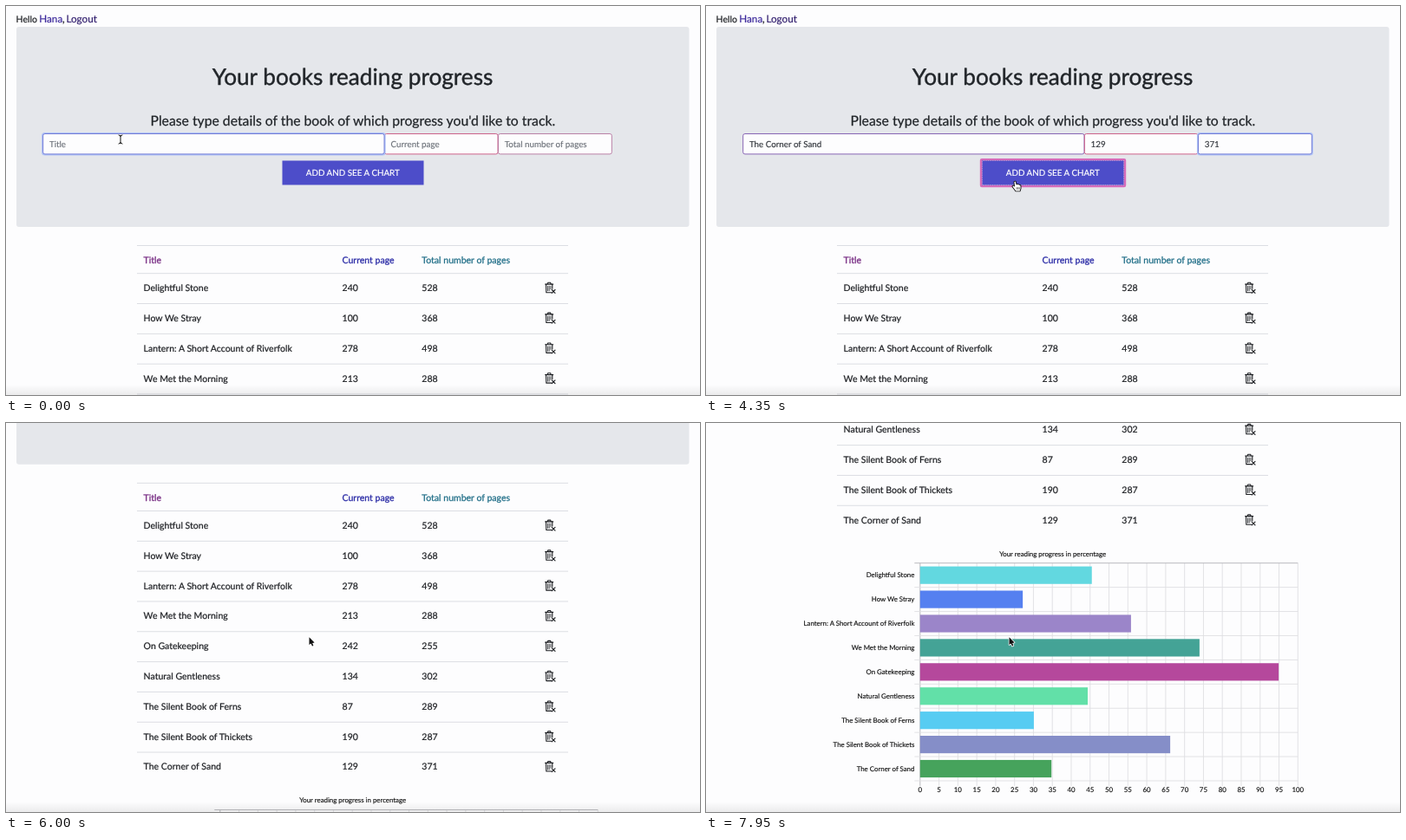
Write an HTML page with a canvas that moves like this. It is 800 px wide and 449 px high and loops after 8 s.

```html
<!DOCTYPE html>
<html lang="en">
<head>
<meta charset="utf-8">
<title>Reading progress</title>
<style>
html, body { margin: 0; width: 100%; height: 100%; overflow: hidden; background: #fdfdfe; }
canvas { display: block; width: 800px; height: 449px; }
</style>
</head>
<body>
<canvas id="stage"></canvas>
<script>
const W = 800, H = 449, LOOP = 8000;
const canvas = document.getElementById('stage');
const ctx = canvas.getContext('2d');
const dpr = window.devicePixelRatio || 1;
canvas.width = Math.round(W * dpr);
canvas.height = Math.round(H * dpr);
// Unhinted advances keep the letter spacing even while scrolling
ctx.textRendering = 'geometricPrecision';

const INK = '#1b1d21', RULE = '#dcdee3', MUTED = '#6b7078';
const ROW = 34.82, FIRST_ROW = 325.3;
const NEW_TITLE = 'The Corner of Sand';

// title, current page, total pages, bar colour
const books = [
  ['Delightful Stone', 240, 528, '#62d8e0'],
  ['How We Stray', 100, 368, '#5580f0'],
  ['Lantern: A Short Account of Riverfolk', 278, 498, '#9b85c9'],
  ['We Met the Morning', 213, 288, '#44a396'],
  ['On Gatekeeping', 242, 255, '#b5489c'],
  ['Natural Gentleness', 134, 302, '#62e0a8'],
  ['The Silent Book of Ferns', 87, 289, '#57ccf2'],
  ['The Silent Book of Thickets', 190, 287, '#858ec8'],
  [NEW_TITLE, 129, 371, '#46a35c']
];

const fields = [
  { x: 42.7, w: 393.3, hint: 'Title', text: NEW_TITLE, border: '#7c55ad', start: 650, step: 88, focus: [0, 2400] },
  { x: 436.4, w: 130.6, hint: 'Current page', text: '129', border: '#c9527f', start: 2600, step: 170, focus: [2400, 3150] },
  { x: 567.5, w: 130.8, hint: 'Total number of pages', text: '371', border: '#b4739d', start: 3350, step: 150, focus: [3150, 4600] }
];
const CLEARED = 4750;

const scrollKeys = [[5230, 0], [5600, 106.3], [6000, 206.9], [6700, 468.4], [7150, 492]];

const clamp = (v, a, b) => Math.min(b, Math.max(a, v));
const ease = p => p * p * (3 - 2 * p);
const progress = (t, a, b) => ease(clamp((t - a) / (b - a), 0, 1));

// Monotone cubic through [time, value] pairs
function curve(keys, t) {
  const n = keys.length - 1;
  if (t <= keys[0][0]) return keys[0][1];
  if (t >= keys[n][0]) return keys[n][1];
  const slope = i => (keys[i + 1][1] - keys[i][1]) / (keys[i + 1][0] - keys[i][0]);
  const tangent = i => {
    if (i === 0 || i === n) return 0;
    const a = slope(i - 1), b = slope(i);
    return a * b > 0 ? 2 * a * b / (a + b) : 0;
  };
  let i = 0;
  while (t > keys[i + 1][0]) i++;
  const [t0, v0] = keys[i], [t1, v1] = keys[i + 1];
  const d = t1 - t0, u = (t - t0) / d, u2 = u * u, u3 = u2 * u;
  return v0 * (2 * u3 - 3 * u2 + 1) + v1 * (3 * u2 - 2 * u3)
    + d * (tangent(i) * (u3 - 2 * u2 + u) + tangent(i + 1) * (u3 - u2));
}

function text(str, x, y, size, color = INK, align = 'left', weight = 0.2) {
  ctx.font = `${size}px Lato, sans-serif`;
  ctx.textAlign = align;
  ctx.fillStyle = ctx.strokeStyle = color;
  ctx.lineWidth = weight;
  ctx.lineJoin = 'round';
  ctx.fillText(str, x, y);
  if (weight) ctx.strokeText(str, x, y);
}

function line(x1, y1, x2, y2, color, width = 1) {
  ctx.strokeStyle = color;
  ctx.lineWidth = width;
  ctx.beginPath();
  ctx.moveTo(x1, y1);
  ctx.lineTo(x2, y2);
  ctx.stroke();
}

function box(x, y, w, h, r, fill, stroke, width = 1) {
  ctx.beginPath();
  ctx.roundRect(x, y, w, h, r);
  if (fill) { ctx.fillStyle = fill; ctx.fill(); }
  if (stroke) { ctx.strokeStyle = stroke; ctx.lineWidth = width; ctx.stroke(); }
}

function shape(points, fill, stroke, width = 1) {
  ctx.beginPath();
  points.forEach(([x, y]) => ctx.lineTo(x, y));
  ctx.closePath();
  ctx.lineJoin = 'round';
  ctx.strokeStyle = stroke;
  ctx.lineWidth = width;
  ctx.stroke();
  ctx.fillStyle = fill;
  ctx.fill();
}

function drawField(f, t) {
  const y = 147.5, h = 23.4;
  const focused = t >= f.focus[0] && t < f.focus[1];
  if (focused) box(f.x - 1.6, y - 1.6, f.w + 3.2, h + 3.2, 3.5, '#aec2f6');
  box(f.x, y, f.w, h, 2.2, '#fdfdfe', focused ? '#6a72d2' : f.border, 0.9);
  const count = t < CLEARED ? clamp(Math.floor((t - f.start) / f.step) + 1, 0, f.text.length) : 0;
  const typed = f.text.slice(0, count);
  const x = f.x + 7.2;
  if (count) text(typed, x, 162.6, 9.82, '#30343a', 'left', 0.15);
  else text(f.hint, x, 162.6, 9.82, MUTED, 'left', 0.15);
  const typing = t >= f.start && t < f.start + f.step * f.text.length + 150;
  if (focused && typing) {
    const cx = x + ctx.measureText(typed).width + 0.3;
    line(cx, 153.5, cx, 165, '#222', 0.8);
  }
}

function drawForm(t) {
  text('Hello', 11.6, 18.8, 10.52);
  text('Hana', 38.3, 18.8, 11.7, '#3d2a9c');
  text(',', 65.1, 18.8, 11.7);
  text('Logout', 69.4, 18.8, 11.7, '#33206f');
  box(12, 24, 775.5, 231, 3, '#e5e7eb');
  text('Your books reading progress', 399.5, 91, 26.2, '#212529', 'center', 0.4);
  text("Please type details of the book of which progress you'd like to track.", 399.8, 138.4, 15.76, '#212529', 'center', 0.25);
  const isFocused = f => t >= f.focus[0] && t < f.focus[1];
  fields.filter(f => !isFocused(f)).forEach(f => drawField(f, t));
  fields.filter(isFocused).forEach(f => drawField(f, t));

  box(318.5, 178.6, 163, 28, 0, '#4d4dc9');
  if (t >= 4150 && t < CLEARED) {
    box(317, 177.1, 166, 31, 1, null, '#d66cba', 2.4);
    ctx.setLineDash([1.3, 1.3]);
    box(318.4, 178.5, 163.2, 28.2, 0, null, '#7a4cc0', 0.8);
    ctx.setLineDash([]);
  }
  text('ADD AND SEE A CHART', 399.8, 196.1, 9.84, '#fff', 'center', 0.2);
}

function drawBin(y) {
  ctx.save();
  ctx.translate(627, y);
  ctx.lineCap = 'round';
  line(-5.3, -4.2, 3.6, -4.2, INK, 1.2);
  ctx.lineWidth = 1.1;
  ctx.beginPath();
  ctx.moveTo(-2.8, -4.4);
  ctx.lineTo(-2.3, -6);
  ctx.lineTo(0.7, -6);
  ctx.lineTo(1.2, -4.4);
  ctx.moveTo(2.8, -4);
  ctx.lineTo(2.8, 1);
  ctx.moveTo(-4.5, -4);
  ctx.lineTo(-4.2, 5.4);
  ctx.lineTo(1.8, 5.4);
  ctx.stroke();
  [-2.5, -0.8, 0.9].forEach(x => line(x, -2, x, x > 0 ? 1.4 : 3.4, INK, 0.8));
  line(2.2, 2.2, 6, 6, INK, 1.1);
  line(6, 2.2, 2.2, 6, INK, 1.1);
  ctx.restore();
}

function drawTable() {
  const rule = y => line(151, y, 648, y, RULE);
  rule(276.5);
  text('Title', 158.6, 296.8, 10.52, '#762a82', 'left', 0.3);
  text('Current page', 387.5, 296.8, 10.52, '#2a2ba6', 'left', 0.3);
  text('Total number of pages', 479.3, 296.8, 10.52, '#237089', 'left', 0.3);
  rule(308.7);
  books.forEach(([title, page, total], i) => {
    const y = FIRST_ROW + i * ROW;
    text(title, 158.6, y + 3.8, 10.52);
    text(page, 387.6, y + 3.8, 10.52);
    text(total, 479.3, y + 3.8, 10.52);
    drawBin(y);
    if (i < books.length - 1) rule(308.7 + (i + 1) * ROW);
  });
}

function drawChart() {
  const left = 246.8, right = 682.3, top = 653.7, pitch = 27.92;
  const bottom = top + pitch * books.length;
  const unit = (right - left) / 100;
  text('Your reading progress in percentage', 399.7, 645.6, 7.87, '#111', 'center', 0.15);
  for (let v = 0; v <= 100; v += 5) {
    const x = left + v * unit;
    line(x, top, x, bottom + 6, v ? '#dfdfe2' : '#b4b4b8', 0.9);
    text(v, x, bottom + 13, 7.87, '#111', 'center', 0.15);
  }
  for (let i = 0; i <= books.length; i++) {
    const y = top + i * pitch;
    line(240.3, y, right, y, i ? '#dfdfe2' : '#b4b4b8', 0.9);
  }
  books.forEach(([title, page, total, color], i) => {
    const y = top + (i + 0.5) * pitch;
    ctx.fillStyle = color;
    ctx.fillRect(left, y - 10.1, page / total * 100 * unit, 20.2);
    text(title, 240.4, y + 2.7, 7.87, '#111', 'right', 0.15);
  });
}

function drawBeam(x, y) {
  ctx.lineCap = 'round';
  [['#fff', 2.2], ['#111', 1]].forEach(([color, width]) => {
    line(x, y - 4.5, x, y + 4.5, color, width);
    [-1, 1].forEach(s => {
      line(x, y + s * 4, x - 2, y + s * 5, color, width);
      line(x, y + s * 4, x + 2, y + s * 5, color, width);
    });
  });
  ctx.lineCap = 'butt';
}

function drawArrow(x, y) {
  ctx.save();
  ctx.translate(x, y);
  shape([[0, 0], [0, 8.8], [2, 7.1], [3.5, 10.3], [4.9, 9.7], [3.6, 6.6], [6.1, 6.3]], '#111', '#fff', 1.5);
  ctx.restore();
}

function drawHand(x, y) {
  ctx.save();
  ctx.translate(x, y);
  shape([[-2.6, -5], [-1.3, -5.4], [-0.4, -1.8], [1.3, -2], [3, -1.4], [4.5, -0.6], [4.6, 2.4],
    [3.7, 5.4], [-0.8, 5.4], [-2.8, 2.8], [-4.6, 0.4], [-3.6, -0.5], [-1.9, 0.8]], '#fff', '#111', 1.8);
  [0.1, 1.7, 3.2].forEach(dx => line(dx, 1.2, dx, 3.7, '#111', 0.6));
  ctx.restore();
}

function drawPointer(t) {
  if (t < 600) return drawBeam(132, 154);
  if (t < 3850) return;
  if (t < 4750) {
    const p = progress(t, 3850, 4270);
    const x = 132 + 226 * p, y = 154 + 54 * p;
    const overButton = x > 318 && y > 178;
    if (overButton) drawHand(x, y);
    else if (y < 171) drawBeam(x, y);
    else drawArrow(x, y);
    return;
  }
  const p = progress(t, 4850, 5150);
  const x = 355 - 5.5 * p, y = 202 + 45.3 * p;
  if (y < 206) drawHand(x + 3, y + 6);
  else drawArrow(x, y);
}

function draw(t) {
  ctx.setTransform(dpr, 0, 0, dpr, 0, 0);
  ctx.lineCap = 'butt';
  ctx.fillStyle = '#fdfdfe';
  ctx.fillRect(0, 0, W, H);
  ctx.save();
  ctx.translate(0, -curve(scrollKeys, t));
  drawForm(t);
  drawTable();
  drawChart();
  ctx.restore();

  const shade = ctx.createLinearGradient(0, 437, 0, H);
  shade.addColorStop(0, 'rgba(0,0,0,0)');
  shade.addColorStop(1, 'rgba(0,0,0,0.07)');
  ctx.fillStyle = shade;
  ctx.fillRect(0, 437, W, H - 437);
  drawPointer(t);
}

const began = performance.now();
function tick() {
  draw((performance.now() - began) % LOOP);
  requestAnimationFrame(tick);
}
tick();
</script>
</body>
</html>
```
